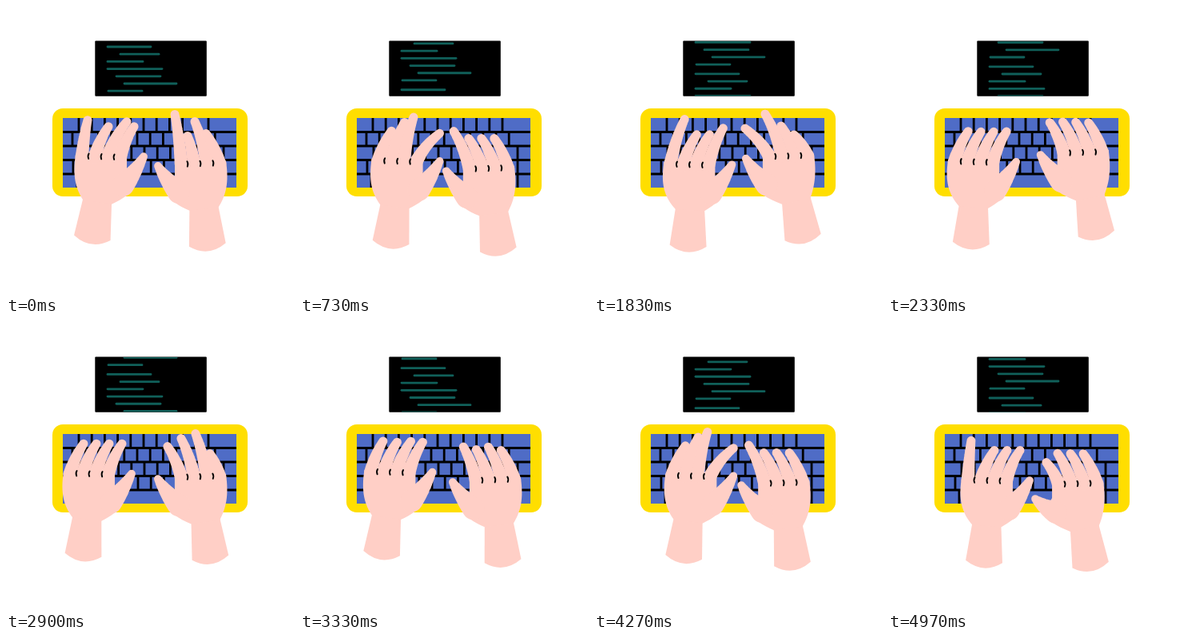
Animation of 360x360 px, one loop 5000 ms. Source, as an HTML page with a canvas:

```html
<!DOCTYPE html>
<html lang="en">
<head>
<meta charset="utf-8">
<title>Typing hands</title>
<style>
html, body { margin: 0; width: 100%; height: 100%; overflow: hidden; background: #fff; }
canvas { display: block; width: 360px; height: 360px; }
</style>
</head>
<body>
<canvas id="stage" width="360" height="360"></canvas>
<script>
const ctx = document.getElementById('stage').getContext('2d');
const LOOP = 5000, CYCLE = 3700;
const SKIN = '#ffcfc6', BLUE = '#4f6cc6', YELLOW = '#ffde00', TEAL = '#10605a';

// Code lines: indent and length, grouped under an even line spacing
const CODE = [[0, 54], [16, 48], [0, 44], [0, 68], [11, 55], [21, 65], [1, 42]];
const CODE_HEIGHT = 67, LINE_GAP = 9.2;

// Key rows: first divider and number of dividers
const ROWS = [[91, 11], [83, 12], [92, 11], [84, 11], [89, 1]];
const KEY_STEP = 16.2, ROW_STEP = 17.5;

// Finger strokes: finger (4 is the thumb), moment, sideways shift, vertical shift
const LEFT = {
  side: 1, wrist: -2, lean: -4.5, thumb: 0,
  x: a => 115.8 + 9.7 * Math.sin(a) + 3.2 * Math.cos(2 * a) - 1.4 * Math.sin(2 * a),
  y: a => 193.2 - 5 * Math.cos(a) + 2.5 * Math.sin(a),
  taps: [
    [0, 0, -10, -8], [2, 0, 7, -6], [1, 650, 0, -12], [2, 650, -5, -19],
    [3, 650, 13, 3], [0, 1270, -13, -12], [0, 1830, 1, -19], [3, 1830, 1, -8]
  ]
};
const RIGHT = {
  side: -1, wrist: 7, lean: 6.5, thumb: 3,
  x: a => 241 - 3.8 * Math.sin(a) + 2 * Math.cos(2 * a),
  y: a => 194.8 + 5 * Math.cos(a) + 6.9 * Math.sin(a)
    - 2.8 * Math.cos(2 * a) - 3.5 * Math.sin(2 * a),
  taps: [
    [0, 0, 9, -24], [1, 0, 9, 3], [2, 0, 2, -15], [0, 650, -3, -10],
    [0, 1270, 2, 11], [4, 1270, 0, 16], [0, 1830, -13, 3], [1, 1830, -4, -15],
    [3, 1830, 0, 11], [1, 2900, 1, -10], [2, 2900, 3, -16], [3, 2900, 5, 9]
  ]
};

function box(x, y, w, h, r, color) {
  ctx.fillStyle = color;
  ctx.beginPath();
  ctx.roundRect(x, y, w, h, r);
  ctx.fill();
}

function line(x1, y1, x2, y2) {
  ctx.beginPath();
  ctx.moveTo(x1, y1);
  ctx.lineTo(x2, y2);
  ctx.stroke();
}

function drawScreen(t) {
  box(111.3, 43.4, 139.5, 69.4, 1, '#000');
  ctx.save();
  ctx.beginPath();
  ctx.rect(111.5, 44, 139, 68.5);
  ctx.clip();
  ctx.strokeStyle = TEAL;
  ctx.lineWidth = 2.8;
  ctx.lineCap = 'round';
  const shift = t / CYCLE * CODE_HEIGHT;
  CODE.forEach(([indent, length], i) => {
    const x = 127 + indent;
    for (let y = 51 + i * LINE_GAP - shift; y < 116; y += CODE_HEIGHT) line(x, y, x + length, y);
  });
  ctx.restore();
}

function drawKeyboard() {
  box(58, 128, 244, 110, 13, YELLOW);
  box(71, 140, 217, 87, 0, BLUE);
  ctx.strokeStyle = '#000';
  ctx.lineWidth = 2.8;
  ctx.lineCap = 'butt';
  ROWS.forEach(([first, count], i) => {
    const top = 140 + i * ROW_STEP, bottom = Math.min(top + ROW_STEP, 227);
    if (i) line(71, top, 288, top);
    for (let k = 0; k < count; k++) line(first + k * KEY_STEP, top, first + k * KEY_STEP, bottom);
    if (i > 1) line(272, top, 272, bottom);
  });
}

// Sum of the soft pulses that move one finger at time t
function reach(taps, finger, t) {
  let dx = 0, dy = 0;
  for (const [f, when, x, y] of taps) {
    if (f !== finger) continue;
    const gap = Math.abs(t - when);
    const pulse = Math.exp(-((Math.min(gap, CYCLE - gap) / 270) ** 2));
    dx += x * pulse;
    dy += y * pulse;
  }
  return [dx, dy];
}

// Tapered curve from base to tip
function digit(bx, by, tx, ty, r1, r2, cx, cy) {
  const N = 36;
  ctx.beginPath();
  for (let i = 0; i <= N; i++) {
    const u = i / N, v = 1 - u;
    const x = v * v * bx + 2 * u * v * cx + u * u * tx;
    const y = v * v * by + 2 * u * v * cy + u * u * ty;
    const r = r1 + (r2 - r1) * u;
    ctx.moveTo(x + r, y);
    ctx.arc(x, y, r, 0, 7);
  }
  ctx.fill();
}

function drawHand(hand, t) {
  const { side, taps } = hand;
  const angle = 2 * Math.PI * t / CYCLE;
  const swing = Math.cos(angle - Math.PI);
  const kx = hand.x(angle), ky = hand.y(angle);
  const wx = kx + hand.wrist + 2.7 * swing, wy = ky + 57;
  const lean = hand.lean + 2 * swing;
  const X = x => kx + side * x, Y = y => ky + y;
  ctx.fillStyle = SKIN;

  // Forearm
  const len = Math.hypot(lean, 45);
  const at = (x, y, d) => [x + 45 / len * d, y - lean / len * d];
  const ex = wx + lean, ey = wy + 44.5;
  ctx.beginPath();
  ctx.moveTo(...at(wx, wy - 3, -18));
  ctx.lineTo(...at(ex, ey, -23));
  ctx.quadraticCurveTo(ex + lean * 0.3, ey + 16, ...at(ex, ey, 23));
  ctx.lineTo(...at(wx, wy - 3, 18));
  ctx.fill();

  // Palm
  ctx.beginPath();
  ctx.moveTo(X(-32), Y(-3));
  ctx.bezierCurveTo(X(-36), Y(24), X(-32), Y(40), ...at(wx, wy, -18 * side));
  ctx.lineTo(...at(wx, wy, 18 * side));
  ctx.bezierCurveTo(X(27), Y(53), X(38), Y(46), X(42), Y(36));
  ctx.lineTo(X(32), Y(18));
  ctx.lineTo(X(32), Y(-3));
  ctx.closePath();
  ctx.fill();

  // Thumb
  const [sx, sy] = reach(taps, 4, t);
  const bx = X(27), by = Y(36);
  const tx = X(53) + sx, ty = Y(hand.thumb) + sy;
  digit(bx, by, tx, ty, 14, 4.9, (bx + tx) / 2 + side * 2, (by + ty) / 2 + 2);

  // Fingers
  for (let i = 0; i < 4; i++) {
    const [rx, ry] = reach(taps, i, t);
    const x = kx - 24 + 16 * i;
    const dx = side * 17 + rx, dy = ry - 37.5;
    digit(x, ky, x + dx, ky + dy, 8.4, 5.5, x + dx * 0.36, ky + dy * 0.57);
  }

  // Knuckle creases
  ctx.strokeStyle = '#000';
  ctx.lineWidth = 1.9;
  ctx.lineCap = 'round';
  for (let i = -1; i <= 1; i++) {
    const x = kx + 16 * i, y = ky + i * 0.5 * side;
    ctx.beginPath();
    ctx.moveTo(x + side * 0.6, y - 3.2);
    ctx.quadraticCurveTo(x - side * 1.2, y - 0.5, x + side * 0.2, y + 3.2);
    ctx.stroke();
  }
}

function draw(t) {
  ctx.fillStyle = '#fff';
  ctx.fillRect(0, 0, 360, 360);
  drawScreen(t);
  drawKeyboard();
  drawHand(LEFT, t % CYCLE);
  drawHand(RIGHT, t % CYCLE);
}

const start = performance.now();
function tick() {
  draw((performance.now() - start) % LOOP);
  requestAnimationFrame(tick);
}
tick();
</script>
</body>
</html>
```
